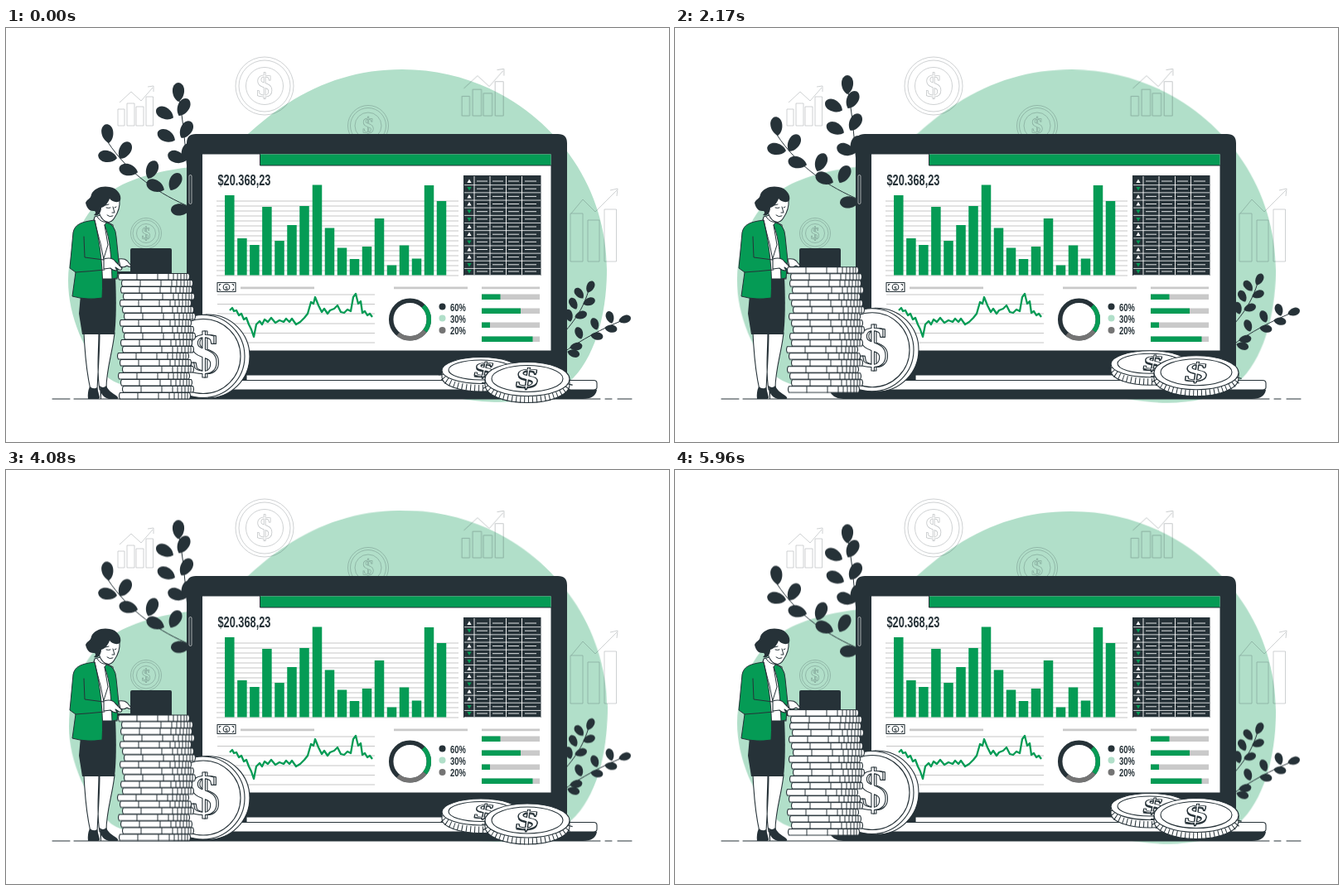
Recreate the animation shown at these times as an HTML page without scripts. Size 800 px wide and 500 px high, loop 6000 ms.

```html
<!DOCTYPE html>
<html lang="en">
<head>
<meta charset="utf-8">
<title>Finance dashboard</title>
<style>
html, body { margin: 0; width: 100%; height: 100%; overflow: hidden; background: #fff; }
svg { display: block; width: 800px; height: 500px; --ink: #263238; --green: #059b55; --mint: #b1dfc9; }
.ink { fill: var(--ink); }
.green { fill: var(--green); }
.mint { fill: var(--mint); }
.gray { fill: #c9c9c9; }
.line { fill: none; stroke: var(--ink); stroke-width: 1; stroke-linejoin: round; stroke-linecap: round; }
.paper { fill: #fff; stroke: var(--ink); stroke-width: 1.1; stroke-linejoin: round; }
.coat { fill: var(--green); stroke: var(--ink); stroke-width: 1; stroke-linejoin: round; }
.ghost { fill: none; stroke: var(--ink); stroke-width: .75; opacity: .3; }
.grid { fill: none; stroke: #c6c6c6; stroke-width: 1; }
.ridge { fill: none; stroke: var(--ink); stroke-dasharray: 1 4; }
.label { font-family: "Liberation Sans", Arial, sans-serif; font-weight: 700; fill: var(--ink); }
.sign { font-family: "Liberation Serif", "Times New Roman", serif; font-weight: 700; text-anchor: middle; }
.blob { transform-origin: 400px 251px; animation: sway 1.5s linear infinite; }
.plant { animation: bob 1.5s linear infinite; }
.coins { animation: lift 6s linear infinite; }
@keyframes sway { 25% { transform: rotate(1deg); } 75% { transform: rotate(-1deg); } }
@keyframes bob { 50% { transform: translateY(-10px); } }
/* one second of rest, then three-second rises cut off by the loop */
@keyframes lift {
  0%, 16.667%, 66.667% { transform: translateY(0); }
  41.667%, 91.667% { transform: translateY(-10px); }
  100% { transform: translateY(-6.667px); }
}
</style>
</head>
<body>
<svg viewBox="0 0 800 500" xmlns="http://www.w3.org/2000/svg">
<defs>
  <path id="leaf" d="M0 1C-5-2-7.500-8-7-14C-6.500-19-3-22 0-22C3-22 6.500-19 7-14C7.500-8 5-2 0 1Z"/>
  <use id="bud" href="#leaf" transform="scale(.66)"/>
  <g id="trend">
    <path d="M135 118V98h8v20zM146 118V91h9v27zM157 118V95h9v23zM169 118V83h8.500v35z"/>
    <path d="M137 90L151 77L163 88L177 72M171 71L178 70L178 77"/>
  </g>
  <g id="disc">
    <path class="paper" d="M.5.5H84.500Q86.500 4 84.500 8H.5Q-1.500 4 .5.500Z"/>
    <path class="line" d="M22 1v7M47 1v7M60 1v7M66 1v7M71 1v7M75 1v7M79 1v7M82 1v7" stroke-width=".8"/>
  </g>
  <path id="up" d="M-2.600 2L0-2.500L2.600 2Z" fill="#fff"/>
  <path id="down" class="green" d="M-2.600-2L0 2.500L2.600-2Z"/>
  <g id="row" stroke="#e4e7e8">
    <path d="M568 0h13M587 0h13M606 0h13M626 0h14" stroke-width="1"/>
    <path d="M553 4.650H645" stroke-width=".9"/>
  </g>
</defs>

<path class="blob mint" d="M75 305C76 255 98 214 130 195C158 178 192 172 222 168C270 160 290 122 340 91C382 64 427 50 478 50C614 50 725 158 725 292C725 350 708 407 674 432C641 453 595 456 545 447C440 430 330 434 240 436C190 438 148 440 124 423C95 395 75 348 75 305Z"/>

<!-- faint outlines -->
<g class="ghost">
  <circle cx="312" cy="70" r="35"/><circle cx="312" cy="70" r="31"/><circle cx="312" cy="70" r="22.500"/>
  <text class="sign" x="312" y="83" font-size="40">$</text>
  <circle cx="437" cy="118" r="24.500"/><circle cx="437" cy="118" r="21.500"/><circle cx="437" cy="118" r="16"/>
  <text class="sign" x="437" y="127" font-size="28">$</text>
  <circle cx="169" cy="248" r="18.500"/><circle cx="169" cy="248" r="16"/><circle cx="169" cy="248" r="11.500"/>
  <text class="sign" x="169" y="255" font-size="21">$</text>
  <use href="#trend"/>
  <use href="#trend" transform="translate(390.700 -33.200) scale(1.18)"/>
  <path d="M681 282V224h15v58zM702 282V232h14v50zM722 282V219h14.500v63z"/>
  <path d="M682 224L696 207L711 222L737 196M729 196L738 194L737 203"/>
</g>

<!-- left plants -->
<g class="plant ink">
  <path class="line" stroke-width="1.300" d="M220 180C216 145 214 108 208 82M224 217C185 201 148 176 123 138"/>
  <use href="#leaf" transform="translate(208 88)"/>
  <use href="#leaf" transform="translate(209 105) rotate(28)"/>
  <use href="#leaf" transform="translate(201 108) rotate(-62)"/>
  <use href="#leaf" transform="translate(212 132) rotate(30)"/>
  <use href="#leaf" transform="translate(203 135) rotate(-64)"/>
  <use href="#leaf" transform="translate(216 160) rotate(-68)"/>
  <use href="#leaf" transform="translate(215 160) rotate(20)"/>
  <use href="#leaf" transform="translate(124 138) rotate(-8)"/>
  <use href="#leaf" transform="translate(133 157) rotate(-80)"/>
  <use href="#leaf" transform="translate(138 157) rotate(30)"/>
  <use href="#leaf" transform="translate(158 174) rotate(-76)"/>
  <use href="#leaf" transform="translate(172 181) rotate(22)"/>
  <use href="#leaf" transform="translate(190 195) rotate(-66)"/>
  <use href="#leaf" transform="translate(199 195) rotate(28)"/>
  <use href="#leaf" transform="translate(221 219) rotate(-92)"/>
</g>

<!-- right plants -->
<g class="plant ink">
  <path class="line" stroke-width="1.200" d="M668 374C690 350 697 336 703 317M668 395C698 374 718 364 744 353"/>
  <use href="#bud" transform="translate(702 319) rotate(25)"/>
  <use href="#bud" transform="translate(696 326) rotate(-38)"/>
  <use href="#bud" transform="translate(697 333) rotate(70)"/>
  <use href="#bud" transform="translate(688 339) rotate(-28)"/>
  <use href="#bud" transform="translate(687 349) rotate(72)"/>
  <use href="#bud" transform="translate(681 354) rotate(-15)"/>
  <use href="#bud" transform="translate(740 354) rotate(72)"/>
  <use href="#bud" transform="translate(731 356) rotate(-18)"/>
  <use href="#bud" transform="translate(723 362) rotate(98)"/>
  <use href="#bud" transform="translate(713 364) rotate(-20)"/>
  <use href="#bud" transform="translate(706 371) rotate(98)"/>
  <use href="#bud" transform="translate(694 375) rotate(-20)"/>
  <use href="#bud" transform="translate(681 386) rotate(80)"/>
  <use href="#bud" transform="translate(678 391) rotate(105)"/>
</g>

<!-- laptop -->
<path class="line" d="M56 448H77M82 448H717M723 448H731M738 448H755"/>
<path class="ink" d="M218 425.500V139Q218 128 229 128H666Q677 128 677 139V419H290V425.500Z"/>
<rect x="221" y="177.500" width="3" height="35" rx="1.500" fill="#263238" stroke="#fff" stroke-width=".6"/>
<path fill="#fff" d="M237 152.500H657.500V389.500H237Z"/>
<path class="green" d="M306.500 152.500H657.500V166H306.500Z"/>
<path class="line" d="M306.500 152.500V166H657.500"/>
<path class="paper" d="M290 419H610V425.500H290Z"/>
<path class="ink" d="M186 437H713Q711 448 696 448H203Q190 448 186 437Z"/>
<path class="paper" d="M186 425.500H709Q713 425.500 713 429V434Q713 437 709 437H186Z"/>

<!-- bar chart -->
<text class="label" transform="translate(255.500 189.500) scale(.71 1)" font-size="18">$20.368,23</text>
<path class="grid" d="M254 209H546M254 215H546M254 221H546M254 227H546M254 233H546M254 239H546M254 245H546M254 251H546M254 257H546M254 263H546M254 269H546M254 275H546M254 281H546M254 287H546M254 293H546M254 299H546"/>
<path fill="none" stroke="#059b55" stroke-width="11.500" d="M269.800 298.500V202M284.900 298.500V254M299.900 298.500V262M314.900 298.500V216M330 298.500V257M345 298.500V238M360 298.500V215M375.500 298.500V189.500M390.500 298.500V241.500M405.500 298.500V265.500M420.500 298.500V279M435.500 298.500V264M450.500 298.500V230M465.500 298.500V286.500M480.500 298.500V262.500M495.500 298.500V278.500M510.500 298.500V190M525.500 298.500V209"/>

<!-- table -->
<path class="ink" d="M552 178H645.500V299H552Z"/>
<use href="#row" y="185"/><use href="#row" y="194.200"/><use href="#row" y="203.400"/><use href="#row" y="212.500"/><use href="#row" y="221.700"/><use href="#row" y="230.800"/><use href="#row" y="240"/><use href="#row" y="249.200"/><use href="#row" y="258.300"/><use href="#row" y="267.500"/><use href="#row" y="276.600"/><use href="#row" y="285.800"/><use href="#row" y="294"/>
<path d="M565 179V298M584 179V298M603.500 179V298M622.500 179V298" stroke="#fff" stroke-width=".9"/>
<use href="#up" x="559" y="185"/><use href="#down" x="559" y="194"/><use href="#up" x="559" y="203.500"/><use href="#up" x="559" y="212.500"/><use href="#down" x="559" y="221.500"/><use href="#down" x="559" y="231"/><use href="#up" x="559" y="240"/><use href="#up" x="559" y="249"/><use href="#down" x="559" y="258.500"/><use href="#up" x="559" y="267.500"/><use href="#up" x="559" y="276.500"/><use href="#down" x="559" y="286"/><use href="#down" x="559" y="294"/>

<!-- lower panels -->
<path class="paper" d="M255 307.500H277V318.500H255Z" stroke-width="1.500"/>
<circle class="paper" cx="266" cy="313" r="3.800"/>
<text class="sign ink" x="266" y="315.500" font-size="7">$</text>
<path class="line" d="M257.500 311V309.500H259M273 309.500H274.500V311M257.500 315V316.500H259M273 316.500H274.500V315"/>
<path class="gray" d="M283 312.500H372V315.300H283ZM468 312.500H557V315.300H468ZM574 312.500H644V315.300H574Z"/>
<path class="grid" d="M255 322H445M255 333.500H445M255 345H445M255 357H445M255 368.500H445M255 380H445"/>
<path fill="none" stroke="#059b55" stroke-width="2.300" stroke-linejoin="round" d="M270 341L273 338L275 342L278 341L281 347L284 345L287 352L290 350L293 358L296 364L299 373L302 358L306 354L309 358L312 352L316 355L320 350L325 356L330 353L335 355L338 351L342 355L345 351L350 358L355 355L360 350L364 345L368 331L371 333L373 325L377 335L381 343L384 339L388 345L391 341L396 339L400 335L404 343L408 344L412 340L416 342L419 325L422 321L425 333L428 330L430 344L433 342L436 347L439 345L442 349"/>
<g fill="none" stroke-width="5.500">
  <circle cx="487.500" cy="352" r="22.800" stroke="#263238"/>
  <path stroke="#059b55" d="M503.500 335.700A22.800 22.800 0 0 1 505.500 366"/>
  <path stroke="#747474" d="M505.500 366A22.800 22.800 0 0 1 473 369.600"/>
</g>
<circle class="ink" cx="526.500" cy="336.500" r="4"/>
<circle class="mint" cx="526.500" cy="350.500" r="4"/>
<circle fill="#747474" cx="526.500" cy="365" r="4"/>
<g class="label" font-size="13.300">
  <text transform="translate(536 341.500) scale(.71 1)">60%</text>
  <text transform="translate(536 355.500) scale(.71 1)">30%</text>
  <text transform="translate(536 370) scale(.71 1)">20%</text>
</g>
<path class="gray" d="M574 321.500H644V328H574ZM574 338.500H644V345H574ZM574 355.500H644V362H574ZM574 372.500H644V379H574Z"/>
<path class="green" d="M574 321.500H596.500V328H574ZM574 338.500H621V345H574ZM574 355.500H584V362H574ZM574 372.500H635.500V379H574Z"/>

<!-- woman -->
<path class="paper" d="M94 368C95 390 97 415 102 437L110 437C111 415 113 390 113 368ZM112 368C112 390 109 415 113 437L121 435C121 412 129 390 131 368Z"/>
<path class="ink" d="M101 433Q106 437 110 434L113 446Q113 448 110 448H99Q98 440 101 433ZM113 432Q117 436 121 432C124 440 132 442 135 446Q136 448 133 448H124Q117 446 115 441V448H114Z"/>
<path class="ink" d="M90 322L88 345L92 370H131Q134 345 132 300L112 300Z"/>
<path class="paper" d="M107 228L104 240L116 303H134L129 238L121 234V224Z"/>
<path class="coat" d="M121 235Q132 237 133 252L136 281L134 302L128 303C127 278 126 255 119 238Z"/>
<path class="coat" d="M107 232C91 234 83 237 81 247L77 290L84 295L80 324Q98 329 116 326C118 296 114 262 107 232Z"/>
<path class="line" d="M94 252L95 277L118 280M84 295Q100 294 119 292M107 232Q111 250 114 260L118 280M119 238L123 262L118 278"/>
<path class="paper" d="M118 279Q128 276 132 282L140 290Q139 294 135 291L132 289L134 293Q129 293 126 290L118 291ZM136 279Q143 278 146 281L151 287Q150 290 146 287Q142 290 138 288Z"/>
<path class="paper" d="M111 211C111 223 114 231 121 234Q127 236 131 229Q138 219 137 207L122 203Z"/>
<path class="ink" d="M96 211C98 206 102 207 103 201C106 193 117 190 125 192C134 193 140 202 138 208C135 212 128 210 125 206C123 212 119 216 115 217C115 223 111 228 106 226C108 224 109 223 107 221C100 222 97 216 96 211Z"/>
<path class="line" d="M121 217Q124 218 126 217M131 217L133 216M129 216L131 223L128 223M122 226Q125 229 129 227M120 214L124 213" stroke-width=".9"/>
<path class="line" d="M110 228Q115 236 122 234"/>

<path class="ink" d="M150 268Q150 266 152 266H198Q200 266 200 268V297H134V294H150Z"/>

<!-- upright coin and stack -->
<g class="coins">
  <ellipse class="paper" cx="243.500" cy="396.500" rx="50.500" ry="50.500"/>
  <path class="ridge" stroke-width="6" d="M241 348.500A49 48.500 0 0 1 241 444.500"/>
  <ellipse class="paper" cx="237.500" cy="396.500" rx="50.500" ry="50"/>
  <ellipse class="paper" cx="238" cy="396.500" rx="45" ry="45"/>
  <text class="sign paper" x="241" y="417" font-size="70">$</text>
  <text class="sign paper" x="238.500" y="417" font-size="70">$</text>
  <use href="#disc" x="136" y="296"/><use href="#disc" x="140" y="304"/><use href="#disc" x="139" y="312"/><use href="#disc" x="142" y="320"/><use href="#disc" x="138" y="328"/><use href="#disc" x="141" y="336"/><use href="#disc" x="143" y="344"/><use href="#disc" x="138" y="352"/><use href="#disc" x="141" y="360"/><use href="#disc" x="143" y="368"/><use href="#disc" x="139" y="376"/><use href="#disc" x="141" y="384"/><use href="#disc" x="135" y="392"/><use href="#disc" x="138" y="400"/><use href="#disc" x="141" y="408"/><use href="#disc" x="136" y="416"/><use href="#disc" x="139" y="424"/><use href="#disc" x="141" y="432"/><use href="#disc" x="137" y="440"/>
</g>

<!-- flat coins -->
<g class="coins">
  <path class="paper" d="M526 413V422A47 17 0 0 0 620 422V413Z"/>
  <path class="ridge" stroke-width="8" d="M526 418A47 17 0 0 0 620 418"/>
  <ellipse class="paper" cx="573" cy="413.500" rx="47" ry="16"/>
  <ellipse class="paper" cx="573" cy="413" rx="39" ry="12"/>
  <g transform="translate(577 413) skewX(-12) scale(1.300 .62)">
    <text class="sign ink" x="0" y="14" font-size="38">$</text>
    <text class="sign paper" x="0" y="11.500" font-size="38">$</text>
  </g>
  <path class="paper" d="M578 424V431A51 21.500 0 0 0 680 431V424Z"/>
  <path class="ridge" stroke-width="8" d="M578 428A51 21 0 0 0 680 428"/>
  <ellipse class="paper" cx="629" cy="424" rx="51" ry="20.500"/>
  <ellipse class="paper" cx="629" cy="423.500" rx="43" ry="16"/>
  <g transform="translate(629 424) skewX(-8) scale(1.350 .75)">
    <text class="sign ink" x="0" y="15" font-size="42">$</text>
    <text class="sign paper" x="0" y="12.500" font-size="42">$</text>
  </g>
</g>
</svg>
</body>
</html>
```
